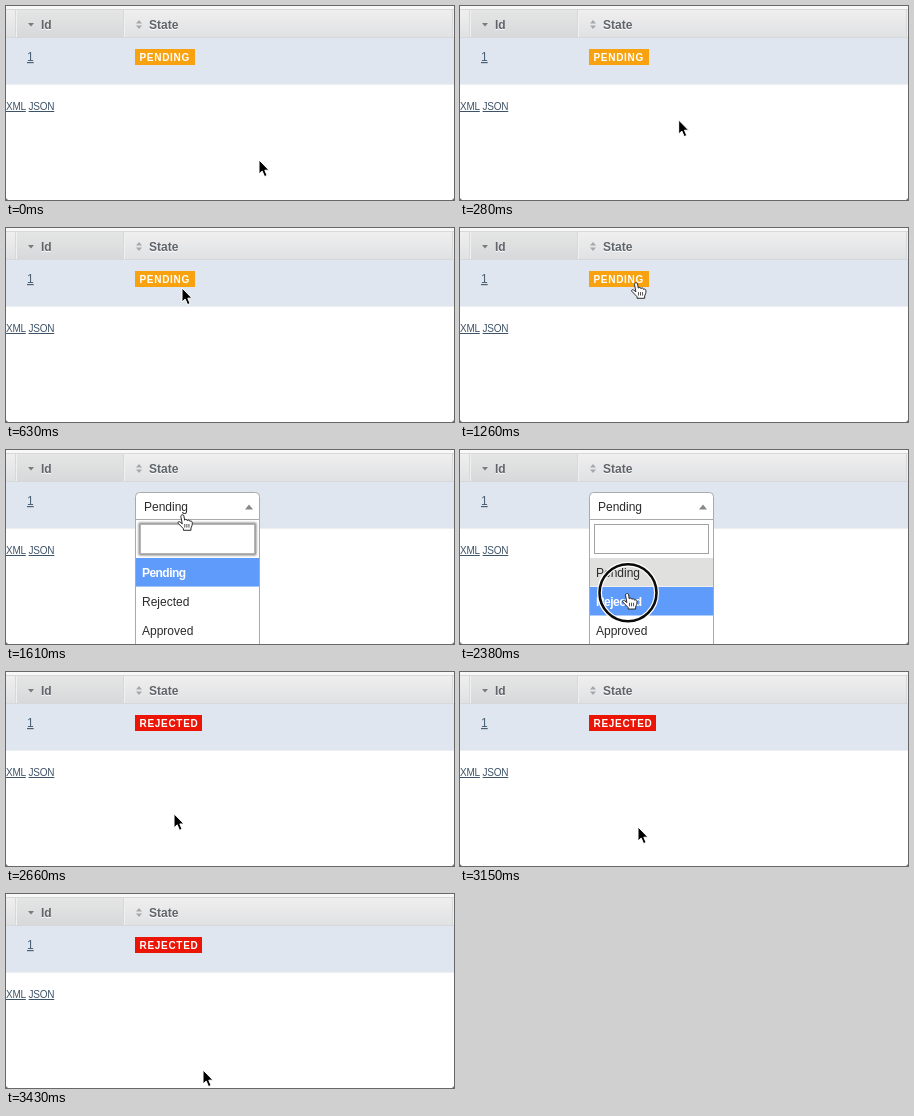
Recreate the animation shown at these times as an HTML page. Size 448 by 194 pixels, loop 3500 ms.

```html
<!DOCTYPE html>
<html lang="en">
<head>
<meta charset="utf-8">
<title>Status picker</title>
<style>
  html, body { margin: 0; width: 100%; height: 100%; overflow: hidden; background: #fff; }
  svg { display: block; width: 448px; height: 194px; font: 12px "Liberation Sans", Arial, sans-serif; }
  .head { font-weight: bold; fill: #5e6469; }
  .link { fill: #4b6075; text-decoration: underline; }
  .small { font-size: 10px; letter-spacing: -.25px; fill: #3f5368; }
  .tag { font-weight: bold; font-size: 10px; letter-spacing: .7px; fill: #fff; }
  .option { fill: #2b2b2b; }
</style>
</head>
<body>
<svg viewBox="0 0 448 194">
  <defs>
    <linearGradient id="plain" x2="0" y2="1">
      <stop stop-color="#efefef"/><stop offset="1" stop-color="#dfe1e2"/>
    </linearGradient>
    <linearGradient id="sorted" x2="0" y2="1">
      <stop stop-color="#e5e5e5"/><stop offset="1" stop-color="#d6d8d9"/>
    </linearGradient>
    <filter id="blur" x="-10%" y="-30%" width="120%" height="160%">
      <feGaussianBlur stdDeviation="1.2"/>
    </filter>
  </defs>

  <rect width="448" height="194" fill="#fff"/>
  <rect width="448" height="4" fill="#f8f8f8"/>
  <rect y="4" width="448" height="28" fill="url(#plain)"/>
  <rect x="9" y="4" width="108" height="28" fill="url(#sorted)"/>
  <path d="M0 3.5H448M0 31.5H448M9.5 4V31M117.5 4V31M446.5 4V31" stroke="#d6d8da"/>
  <path d="M10.5 4V31M118.5 4V31M447.5 4V31" stroke="#f0f0f0"/>
  <rect y="32" width="448" height="46" fill="#dfe6ef"/>
  <path d="M0 78.5H448" stroke="#eceef1"/>
  <path d="M22 17h6l-3 3.5z" fill="#777c80"/>
  <path d="M130 17.5h6l-3-3.5zM130 19.5h6l-3 3.5z" fill="#a5a8aa"/>
  <g fill="#fff" font-weight="bold"><text x="35" y="24">Id</text><text x="143" y="24">State</text></g>
  <text class="head" x="35" y="23">Id</text>
  <text class="head" x="143" y="23">State</text>
  <text class="link" x="21" y="55">1</text>
  <text class="link small" x="0" y="104">XML</text>
  <text class="link small" x="22.6" y="104">JSON</text>
  <path d="M0 192v2h2zM448 192v2h-2z" fill="#777"/>

  <g id="badge">
    <rect id="badgeBox" x="129" y="43" height="16"/>
    <text id="badgeText" class="tag" x="133.5" y="55"></text>
  </g>

  <g id="select">
    <g id="menu">
      <path d="M129.5 68V196H253.5V68" fill="#fff" stroke="#aaa"/>
      <rect id="glow" x="134" y="74" width="115" height="30" fill="none" stroke="#777" stroke-width="2.5" filter="url(#blur)"/>
      <rect id="search" x="134.5" y="74.5" width="114" height="29" fill="#fff"/>
      <rect id="chosen" x="130" y="108" width="123" height="28.5" fill="#e0e1df"/>
      <rect id="hover" x="130" width="123" height="28.5" fill="#5f9bfa"/>
      <g id="options"></g>
    </g>
    <path id="field" fill="#fff" stroke="#aaa"/>
    <text id="value" class="option" x="138" y="61"></text>
    <path id="caret" fill="#888"/>
  </g>

  <g id="ring" fill="none">
    <circle r="28.5" stroke="#fff" stroke-width="5"/>
    <circle r="28.5" stroke="#0b0b0b" stroke-width="2.6"/>
  </g>
  <path id="arrow" d="M0 0V14L3.2 11.1L5.5 16.6L8.1 15.5L5.8 10.2H10Z" fill="#000" stroke="#fff" stroke-width="1" stroke-linejoin="round"/>
  <g id="hand">
    <g transform="translate(-1 .5) scale(.94)" stroke="#1c1c1c" stroke-linejoin="round" stroke-linecap="round">
      <path d="M-1.6 1.6C-1.6-.2 1.5-.2 1.7 1.6L2.4 6C3 4.6 5.4 5.1 5.3 6.6C6 5.3 8.1 5.8 8.1 7.4C9 6.5 10.6 7.1 10.6 8.8C10.7 11.5 9.8 13 9.2 14.3V16.8H1.2V15.2C-.6 13.3-2.2 11.6-4.4 9.4C-5.3 8-3.5 7-2.2 8.2L-.4 9.7Z" fill="#fff"/>
      <path d="M2.6 10.5V13.5M4.8 10.5V13.5M7 10.5V13.5" fill="none" stroke-width=".8"/>
    </g>
  </g>
</svg>
<script>
const LOOP = 3500, STEP = 70, ROW = 29;
const labels = ["Pending", "Rejected", "Approved"];
const badges = [{ color: "#f8a20f", width: 60 }, { color: "#ec1404", width: 67 }];

// Pointer stops: time, x, y
const path = [
  [0, 253, 154], [140, 246, 146], [350, 205, 98], [560, 177, 63], [630, 176, 60],
  [840, 177, 54], [1540, 177, 54], [1750, 178, 84], [1960, 174, 135],
  [2170, 168, 145], [2310, 168, 143], [2590, 168, 142], [2870, 168, 141],
  [3150, 178, 155], [3430, 197, 176]
];

const el = id => document.getElementById(id);
const set = (id, attrs) => {
  for (const name in attrs) el(id).setAttribute(name, attrs[name]);
};
const show = (id, on) => set(id, { visibility: on ? "inherit" : "hidden" });
const within = (t, from, to) => t >= from && t < to;

const options = labels.map((label, i) => {
  const text = document.createElementNS("http://www.w3.org/2000/svg", "text");
  text.textContent = label;
  text.setAttribute("x", 136);
  text.setAttribute("y", 127 + i * ROW);
  return el("options").appendChild(text);
});

function pointerAt(t) {
  const next = path.findIndex(stop => stop[0] > t);
  if (next < 0) return path[path.length - 1].slice(1);
  const [a, b] = [path[next - 1], path[next]];
  const k = (t - a[0]) / (b[0] - a[0]);
  return [a[1] + (b[1] - a[1]) * k, a[2] + (b[2] - a[2]) * k];
}

function styleOption(text, active) {
  text.setAttribute("fill", active ? "#fff" : "#2b2b2b");
  text.setAttribute("font-weight", active ? "bold" : "normal");
  text.setAttribute("letter-spacing", active ? -.55 : 0);
}

function render(t) {
  const [x, y] = pointerAt(t);
  const pressed = within(t, 1190, 1260) || within(t, 2310, 2450);
  const open = within(t, 1330, 2450);
  const editing = within(t, 1330, 2590);
  const state = t < 2450 ? 0 : 1;
  const hovered = t < 2030 ? 0 : 1;
  const hand = within(t, 700, 2520);

  show("badge", !editing);
  set("badgeBox", { fill: badges[state].color, width: badges[state].width });
  el("badgeText").textContent = labels[state].toUpperCase();

  show("select", editing);
  show("menu", open);
  show("glow", !pressed);
  set("search", { stroke: pressed ? "#a2a2a2" : "#b4b4b4" });
  set("hover", { y: 108 + hovered * ROW });
  options.forEach((text, i) => styleOption(text, i === hovered));
  el("value").textContent = labels[state];
  set("field", {
    d: open ? "M129.5 69.5V46.5q0-4 4-4H249.5q4 0 4 4V69.5z"
            : "M133.5 42.5H249.5q4 0 4 4V67.5q0 4-4 4H133.5q-4 0-4-4V46.5q0-4 4-4z"
  });
  set("caret", { d: open ? "M239 59.5h8l-4-5z" : "M239 54.5h8l-4 5z" });

  const transform = `translate(${x} ${y})`;
  for (const id of ["arrow", "hand", "ring"]) set(id, { transform });
  show("arrow", !hand);
  show("hand", hand);
  show("ring", pressed);
}

function tick() {
  const t = performance.now() % LOOP;
  render(Math.floor(t / STEP) * STEP);
  requestAnimationFrame(tick);
}
tick();
</script>
</body>
</html>
```
